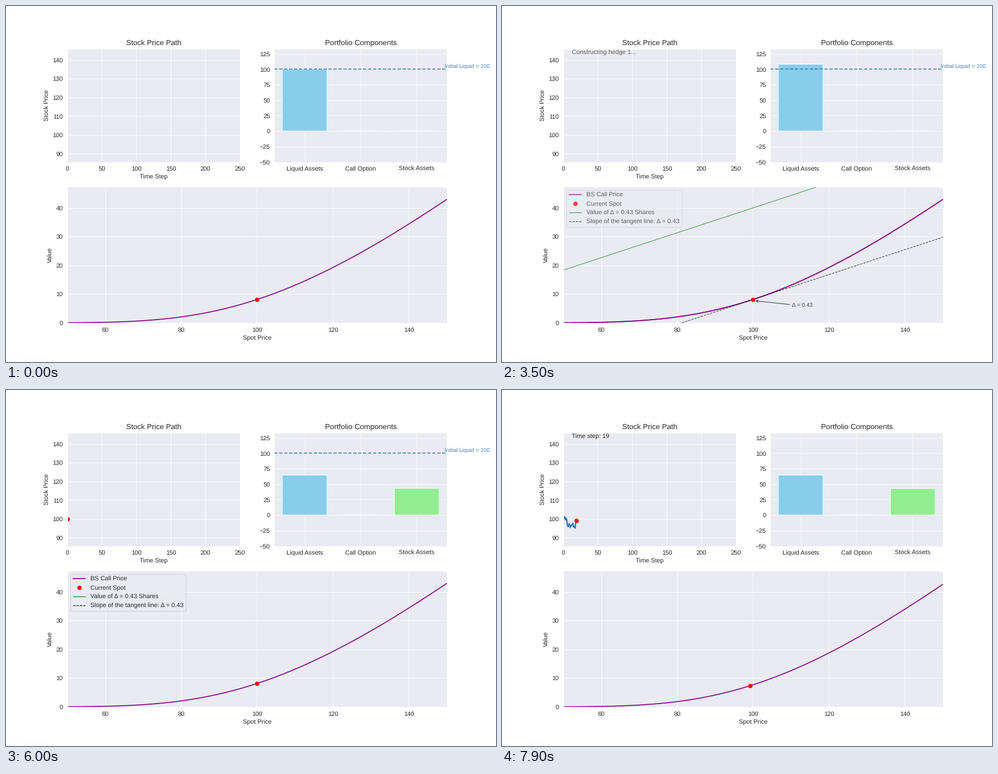
A matplotlib script for the animation above (8000 ms loop, 877x638 px).

```python
import math

import matplotlib.pyplot as plt
import numpy as np
from matplotlib.animation import FuncAnimation

W, H, DPI = 877, 638, 80
FRAMES, INTERVAL = 80, 100

STRIKE, VOL, STEPS = 110, 0.3, 250
SPOT0, CASH0 = 100, 100
PATH = np.array([100, 101, 101.2, 99.4, 100.5, 99.6, 96.8, 95.8, 96.9, 97.4,
                 95.3, 96.35, 96.3, 97, 97.7, 95.6, 96.1, 95, 97.6, 99.15])

# Timeline, in frames
FADE, GROW = 7, 13
PREMIUM_IN, PREMIUM_GROW, PREMIUM_OUT = 0, 8, 29
HEDGE_IN, HEDGE_GROW, HEDGE_OUT = 30, 38, 59
WALK, WALK_TEXT = 60, 67

plt.rcParams.update({
    "font.family": "Liberation Sans",
    "text.hinting": "none",
    "text.color": ".15",
    "axes.facecolor": "#EAEAF2",
    "axes.edgecolor": "white",
    "axes.labelcolor": ".15",
    "axes.grid": True,
    "axes.axisbelow": True,
    "grid.color": "white",
    "lines.solid_capstyle": "round",
    "xtick.color": ".15",
    "ytick.color": ".15",
    "xtick.bottom": False,
    "ytick.left": False,
})

norm_cdf = np.vectorize(lambda x: 0.5 * (1 + math.erf(x / math.sqrt(2))))


def call(spot, step=0):
    """Price and delta of the call after a number of steps, at zero rate."""
    sd = VOL * math.sqrt(1 - step / STEPS)
    d1 = np.log(spot / STRIKE) / sd + sd / 2
    delta = norm_cdf(d1)
    return spot * delta - STRIKE * norm_cdf(d1 - sd), delta


def clamp(x):
    return min(max(x, 0), 1)


def fade(frame, start, end):
    return clamp(min(frame - start, end - frame) / FADE)


def grow(frame, start):
    t = clamp((frame - start) / GROW)
    return t * t * (3 - 2 * t)


spots = np.linspace(50, 150, 201)
prices, _ = call(spots)
price0, delta0 = (float(v) for v in call(SPOT0))

fig = plt.figure(figsize=(W / DPI, H / DPI), dpi=DPI, facecolor="white")
grid = fig.add_gridspec(2, 2, height_ratios=[1, 1.2])
ax_path = fig.add_subplot(grid[0, 0])
ax_bars = fig.add_subplot(grid[0, 1])
ax_call = fig.add_subplot(grid[1, :])

# Stock path
ax_path.set(title="Stock Price Path", xlabel="Time Step", ylabel="Stock Price",
            xlim=(0, STEPS), ylim=(85.5, 146.05))
path_line, = ax_path.plot([], [], color="#1f77b4", lw=2)
path_dot, = ax_path.plot([], [], "ro")
message = ax_path.text(0.05, 0.95, "", transform=ax_path.transAxes)

# Portfolio
ax_bars.set(title="Portfolio Components", xlim=(-0.54, 2.54), ylim=(-50, 133.3))
bars = ax_bars.bar(["Liquid Assets", "Call Option", "Stock Assets"], [CASH0, 0, 0],
                   color=["skyblue", "salmon", "lightgreen"],
                   edgecolor="white", linewidth=1)
for bar in bars:
    bar.set_snap(False)
cash_marks = [
    ax_bars.axhline(CASH0, color="steelblue", ls="--", lw=1.5),
    ax_bars.text(2.5, CASH0, f"Initial Liquid = {CASH0}", color="steelblue",
                 fontsize=9, va="bottom"),
]

# Call price
ax_call.set(xlabel="Spot Price", ylabel="Value",
            xlim=(50, 150), ylim=(0, prices[-1] * 1.1))
curve, = ax_call.plot(spots, prices, color="purple", lw=1.5)
overlay, = ax_call.plot(spots, prices, color="purple", lw=1.5, label="BS Call Price")
call_dot, = ax_call.plot([SPOT0], [price0], "ro", zorder=5, label="Current Spot")
shares, = ax_call.plot(spots, 40 + delta0 * (spots - SPOT0), color="green", lw=1,
                       label=f"Value of Δ = {delta0:.2f} Shares")
tangent, = ax_call.plot(spots, price0 + delta0 * (spots - SPOT0), "k--", lw=1,
                        label=f"Slope of the tangent line: Δ = {delta0:.2f}")
note = ax_call.annotate(f"Δ = {delta0:.2f}", xy=(100.6, 7.65), xytext=(110.3, 5.4),
                        fontsize=9, color="black", zorder=6,
                        arrowprops=dict(arrowstyle="->", color="black", lw=1, shrinkB=0))
hedge_marks = [overlay, shares, tangent, note, note.arrow_patch]

legend = ax_call.legend(handles=[overlay, call_dot, shares, tangent],
                        loc="upper left", frameon=True)
legend_parts = [*legend.legend_handles, *legend.get_texts()]


def set_alpha(artists, alpha):
    for artist in artists:
        artist.set_alpha(alpha)
        artist.set_visible(alpha > 0)


def set_message(frame):
    if frame <= PREMIUM_OUT:
        text, alpha = "Receiving premium...", fade(frame, PREMIUM_IN, PREMIUM_OUT)
    elif frame <= HEDGE_OUT:
        text, alpha = "Constructing hedge 1...", fade(frame, HEDGE_IN, HEDGE_OUT)
    else:
        text, alpha = f"Time step: {frame - WALK}", fade(frame, WALK_TEXT, math.inf)
    message.set_text(text)
    set_alpha([message], alpha)


def update(frame):
    step = max(frame - WALK, 0)
    spot = PATH[step]
    set_message(frame)

    walked = step + 1 if frame >= WALK else 0
    path_line.set_data(range(walked), PATH[:walked])
    path_dot.set_data([step][:walked], [spot][:walked])

    hedge = delta0 * grow(frame, HEDGE_GROW)
    premium = price0 * grow(frame, PREMIUM_GROW)
    bars[0].set_height(CASH0 + premium - hedge * SPOT0)
    bars[2].set_height(hedge * spot)

    curve.set_ydata(call(spots, step)[0])
    call_dot.set_data([spot], [float(call(spot, step)[0])])

    set_alpha(hedge_marks, fade(frame, HEDGE_IN, HEDGE_OUT))
    set_alpha(cash_marks, fade(frame, -math.inf, WALK_TEXT))
    legend_alpha = fade(frame, HEDGE_IN, WALK_TEXT)
    set_alpha(legend_parts, legend_alpha)
    set_alpha([legend.get_frame()], 0.8 * legend_alpha)
    return []


anim = FuncAnimation(fig, update, frames=FRAMES, interval=INTERVAL,
                     init_func=lambda: update(0), repeat=True, repeat_delay=0)
plt.show()
```
